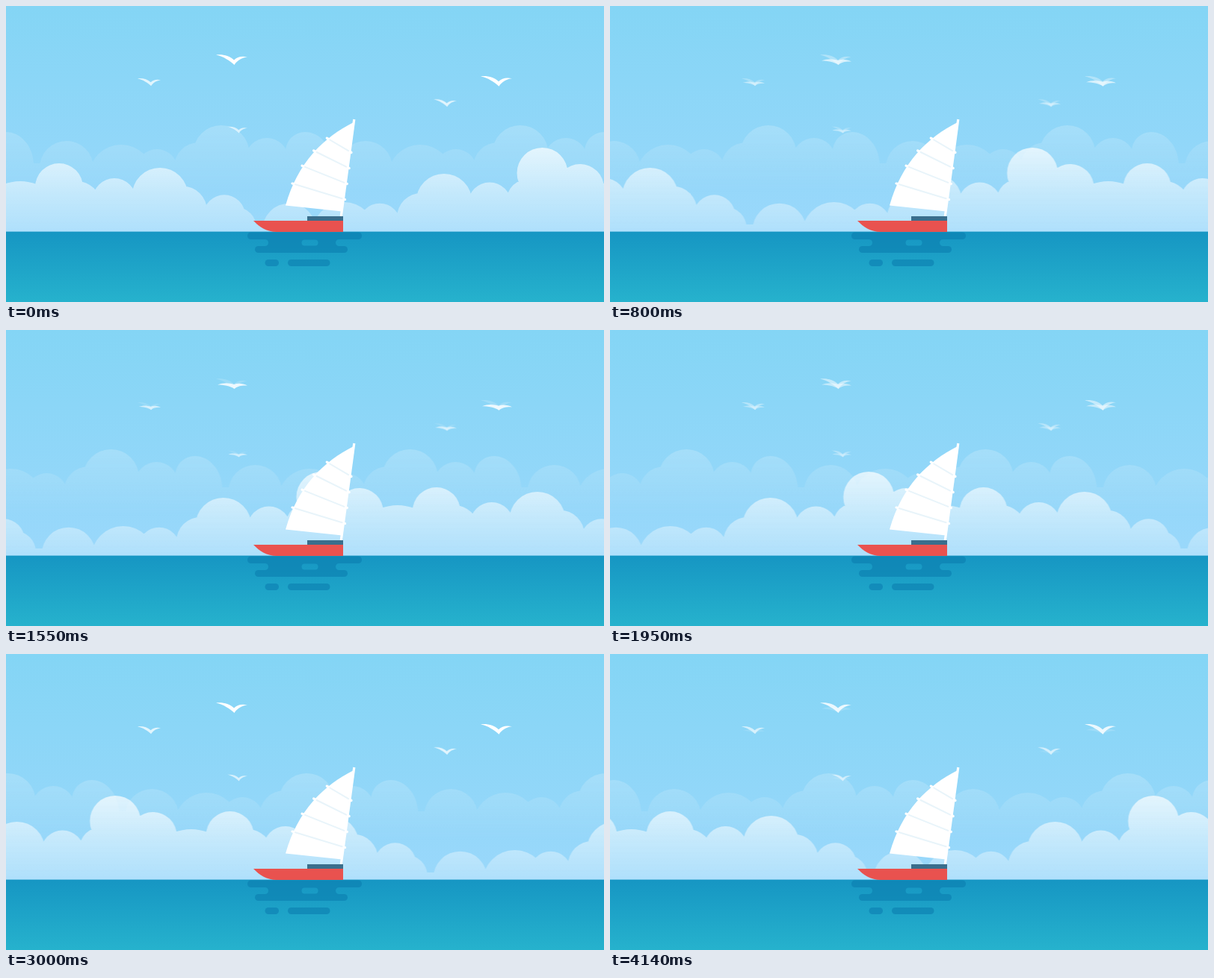
Animation of 800x397 px, one loop 4190 ms. Source, as an HTML page:

```html
<!DOCTYPE html>
<html lang="en">
<head>
<meta charset="utf-8">
<title>Sailing boat</title>
<style>
  html, body { margin: 0; width: 100%; height: 100%; overflow: hidden; background: #84d5f5; }
  svg { display: block; width: 100%; height: 100%; }

  /* 50 ms steps, with a single 40 ms step before 3290 ms */
  .drift { animation: drift 4190ms infinite; }
  .far { --w: 400px; }
  .near { --w: 800px; }
  @keyframes drift {
    0% { transform: translateX(0); animation-timing-function: steps(65); }
    77.5655% { transform: translateX(calc(var(--w) * -65 / 84)); animation-timing-function: step-end; }
    78.52% { transform: translateX(calc(var(--w) * -66 / 84)); animation-timing-function: steps(18); }
    100% { transform: translateX(calc(var(--w) * -1)); }
  }

  /* seven wing beats per loop, cross-fading two poses */
  #up, #down { animation: fade 598.571ms infinite; }
  #down { animation-name: show; }
  @keyframes fade {
    0%, 100% { opacity: 1; animation-timing-function: steps(6); }
    50% { opacity: 0; animation-timing-function: steps(6); }
  }
  @keyframes show {
    0%, 100% { opacity: 0; animation-timing-function: steps(6); }
    50% { opacity: 1; animation-timing-function: steps(6); }
  }
</style>
</head>
<body>
<svg viewBox="0 0 800 397">
  <defs>
    <linearGradient id="sky" x2="0" y2="1">
      <stop stop-color="#84d5f5"/><stop offset="1" stop-color="#9ad8fb"/>
    </linearGradient>
    <linearGradient id="sea" x2="0" y2="1">
      <stop stop-color="#1696c3"/><stop offset="1" stop-color="#26b2cd"/>
    </linearGradient>
    <linearGradient id="haze" gradientUnits="userSpaceOnUse" x1="0" x2="0" y1="160" y2="250">
      <stop stop-color="#fff" stop-opacity=".2"/><stop offset="1" stop-color="#fff" stop-opacity="0"/>
    </linearGradient>
    <linearGradient id="puff" gradientUnits="userSpaceOnUse" x1="0" x2="0" y1="190" y2="303">
      <stop stop-color="#fff" stop-opacity=".71"/><stop offset="1" stop-color="#fff" stop-opacity=".21"/>
    </linearGradient>
  </defs>

  <rect width="800" height="303" fill="url(#sky)"/>
  <g class="drift far"><path id="far" fill="url(#haze)"/></g>
  <g fill="#fff"><g id="up"></g><g id="down"></g></g>
  <g class="drift near"><path id="near" fill="url(#puff)"/></g>
  <rect y="302.6" width="800" height="94.4" fill="url(#sea)"/>

  <g fill="#0b7db0" fill-opacity=".6">
    <rect x="323" y="303.5" width="153" height="9.5" rx="4.5"/>
    <path fill-rule="evenodd" d="M346.5 313A4.5 4.5 0 0 1 346.5 322H445.5A4.5 4.5 0 0 1 445.5 313Z
      M399.5 313.5H413.5A4 4 0 0 1 413.5 321.5H399.5A4 4 0 0 1 399.5 313.5Z"/>
    <rect x="333" y="322" width="124" height="9" rx="4.5"/>
    <rect x="346.5" y="340" width="18.5" height="9" rx="4.5"/>
    <rect x="377" y="340" width="56.5" height="9" rx="4.5"/>
  </g>

  <path d="M465.8 152L448.3 282" stroke="#fff" stroke-width="3.2"/>
  <path d="M465 156C425 176 390 210 374 267.5L449.5 275.5Z" fill="#fff"/>
  <g stroke-linecap="round">
    <path id="ends" stroke="#fff" stroke-width="3.2"/>
    <path id="battens" stroke="#e8f4fa" stroke-width="2"/>
  </g>
  <rect x="403" y="282" width="48" height="6" fill="#3a6e8c"/>
  <path d="M331 288H451V303H362C349 303 339 296.5 331 288Z" fill="#e9524f"/>
</svg>
<script>
  const BASE = 303;
  const el = id => document.getElementById(id);
  const draw = (id, d) => el(id).setAttribute('d', d);
  const band = y => `M-60 ${y}H1700V${BASE}H-60Z`;
  const disc = (x, top, r) => `M${x - r} ${top + r}a${r} ${r} 0 0 1 ${2 * r} 0a${r} ${r} 0 0 1 ${-2 * r} 0Z`;
  const dome = (x, top, r = 32) => `M${x - r} ${top + r}a${r} ${r} 0 0 1 ${2 * r} 0V${BASE}H${x - r}Z`;

  // One cloud bank serves both layers: [offset from tallest puff, drop below it, radius]
  const bank = [[-207, 21, 36], [-134, 26, 43], [-86, 32, 28], [-30, 23, 33], [0, 0, 37.5], [61, 17, 29]];
  const cloud = (x, top, tilt = 0, flip = 1, puffs = bank) =>
    puffs.map(([dx, drop, r]) => dome(x + flip * dx, top + drop + tilt * dx, r)).join('');

  let far = band(211), near = band(293);
  for (let x = -400; x <= 1200; x += 400) {
    far += cloud(x + 288, 160) + dome(x, 169, 26) + `M${x} 169c20 0 36 19 37 42h-37Z`;
  }
  for (let x = -800; x <= 800; x += 800) {
    near += cloud(x + 586, 225, -0.09) + cloud(x + 206, 217, -0.05, -1, bank.slice(2))
      + dome(x + 71, 211) + dome(x + 95, 235) + dome(x + 308, 270, 27)
      + dome(x + 701, 231) + disc(x + 717.5, 190, 34) + dome(x + 720, 225, 25)
      + dome(x + 768, 212) + dome(x + 819, 235, 60);
  }
  draw('far', far);
  draw('near', near);

  // Smaller birds are fainter
  const flock = [[305, 72, 1], [659, 100.8, 1], [193.7, 102, .74], [589.8, 130, .74], [311.4, 166, .64]];
  const poses = {
    up: 'M-24-6.5C-15-7.5-6-5.5 0 .5C4-4 11-5.5 18-3.5C11-3 4 1 .5 7C-5 2-14-4.5-24-6.5Z',
    down: 'M-22 1.5C-14-2-6-1 0 1C5-1 12-.5 18 2.5C12 2 4 3 .5 7C-5 3-14 1.5-22 1.5Z'
  };
  for (const id in poses) {
    el(id).innerHTML = flock.map(([x, y, s]) =>
      `<path d="${poses[id]}" transform="translate(${x} ${y}) scale(${s})" opacity="${s}"/>`).join('');
  }

  // Battens run from the curved edge of the sail to the mast
  const bezier = (t, a, b, c, d) =>
    (1 - t) ** 3 * a + 3 * t * (1 - t) ** 2 * b + 3 * t * t * (1 - t) * c + t ** 3 * d;
  let ends = '', battens = '';
  for (let i = 0; i < 4; i++) {
    const t = 0.3 + 0.173 * i;
    const x1 = bezier(t, 465, 425, 390, 374), y1 = bezier(t, 156, 176, 210, 267.5);
    const x2 = 462 - 2.8 * i, y2 = 196.5 + 21 * i;
    const slope = (y2 - y1) / (x2 - x1);
    const line = (a, b) => `M${x1 + a} ${y1 + a * slope}L${x2 - b} ${y2 - b * slope}`;
    ends += line(-1.5, 0);
    battens += line(2.5, 4);
  }
  draw('ends', ends);
  draw('battens', battens);
</script>
</body>
</html>
```
